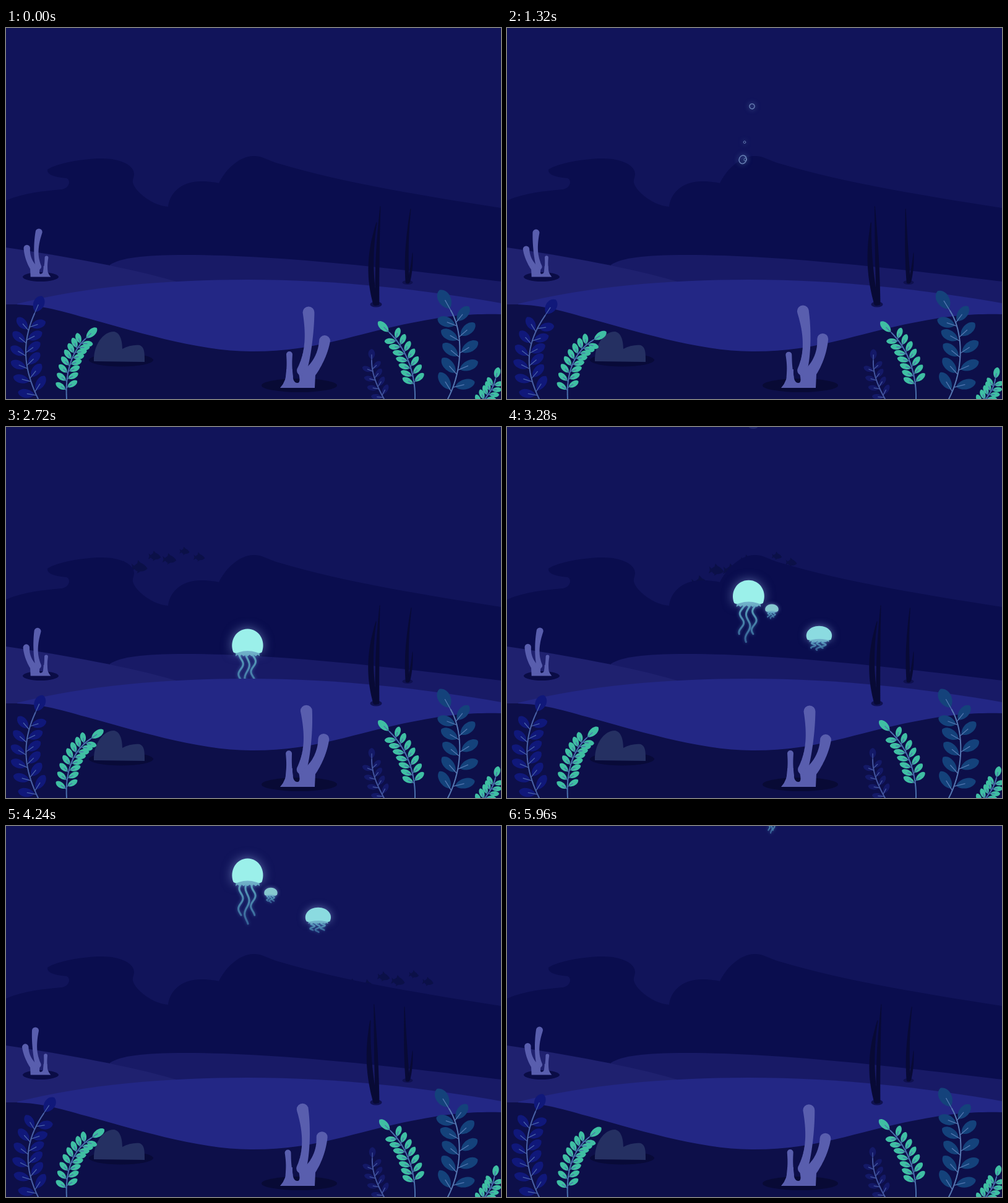
These frames come from a looping animation (800x600 px, 6 s). An HTML page with a canvas:

```html
<!DOCTYPE html>
<html lang="en">
<head>
<meta charset="utf-8">
<title>Deep sea</title>
<style>
html, body { margin: 0; width: 100%; height: 100%; overflow: hidden; background: #11145a; }
canvas { display: block; width: 100vw; height: 100vh; }
</style>
</head>
<body>
<canvas id="sea" width="800" height="600"></canvas>
<script>
const ctx = document.getElementById('sea').getContext('2d');
const LOOP = 6, SWAY = 3, TAU = Math.PI * 2;

const shapes = {
  mountain: 'M0 279C30 266 60 264 90 261C103 259 105 246 98 243C75 241 66 236 67 229C80 219 125 211 155 211C185 211 207 222 207 236C207 243 203 246 206 253C212 268 240 288 262 289C264 270 280 248 315 248C330 248 340 250 344 251C355 228 378 207 400 207C415 207 420 213 440 219C550 252 680 272 800 291V600H0Z',
  ridge: 'M168 383C185 372 220 367 290 367C450 367 650 392 800 410V500H168Z',
  leftHill: 'M0 355C100 370 200 388 275 410V500H0Z',
  centre: 'M18 446C130 418 260 407 390 407C540 407 680 424 800 445V600H18Z',
  front: 'M0 447C50 446 80 455 130 469C200 488 310 523 395 523C500 524 560 495 660 476C720 464 760 462 800 463V600H0Z',
  rock: 'M142 539C141 513 157 491 174 491C184 492 188 505 188 519C197 514 208 512 216 513C224 516 224 525 224 540Z',
  coralBase: 'M-28 0Q-17-12-18-30H-8Q-9-8 0-8Q7-8 0-30L29-22L28 0Z',
  fish: 'M15 2Q9-6 2-8L-3-13L-4-7L-10-2L-15-6L-13 1L-15 8L-9 4Q-6 8-3 8L-4 12L2 8Q11 8 15 2Z'
};
for (const k in shapes) shapes[k] = new Path2D(shapes[k]);

function fill(path, color) {
  ctx.fillStyle = color;
  ctx.fill(path);
}

function oval(x, y, rx, ry, color) {
  ctx.fillStyle = color;
  ctx.beginPath();
  ctx.ellipse(x, y, rx, ry, 0, 0, TAU);
  ctx.fill();
}

// 0 at rest, 1 fully bent; stays at rest until the delay has passed
function wave(t, period, delay = 0) {
  return t < delay ? 0 : (1 - Math.cos(TAU * (t - delay) / period)) / 2;
}

const quad = (a, b, c, u) => (1 - u) ** 2 * a + 2 * u * (1 - u) * b + u * u * c;

// Rounded limb along a curve: radius runs from r0 to r1, swelling in the middle
function limb([x0, y0, x1, y1, x2, y2], r0, r1, swell, bend) {
  ctx.beginPath();
  for (let u = 0; u <= 1.001; u += 0.01) {
    const [x, y] = bend(quad(x0, x1, x2, u), quad(y0, y1, y2, u));
    const r = r0 + (r1 - r0) * u + swell * Math.sin(Math.PI * u);
    ctx.moveTo(x + r, y);
    ctx.arc(x, y, r, 0, TAU);
  }
  ctx.fill();
}

function coral(x, y, sx, sy, s) {
  const bend = (px, py) => {
    const u = -py / 132;
    return [px - 15 * s * u ** 1.7, py - px * 0.15 * u * s];
  };
  ctx.save();
  ctx.translate(x, y);
  ctx.scale(sx, sy);
  fill(shapes.coralBase, '#595eae');
  limb([-13, -18, -13, -36, -13, -54], 6, 5, -1, bend);
  limb([7, -28, 22, -65, 18, -122], 8, 9.5, -2.5, bend);
  limb([18, -22, 40, -46, 44, -76], 10, 9, -1.5, bend);
  ctx.restore();
}

function kelp(curve, r0, r1, swell, amp) {
  const base = curve[1], height = base - curve[5];
  ctx.fillStyle = '#080a35';
  limb(curve, r0, r1, swell, (x, y) => [x + amp * Math.max(0, (base - y) / height) ** 1.8, y]);
}

function leaf(x, y, angle, len, w) {
  ctx.save();
  ctx.translate(x, y);
  ctx.rotate(angle);
  ctx.beginPath();
  ctx.moveTo(len * 0.1, 0);
  ctx.bezierCurveTo(len * 0.3, -w * 0.72, len * 0.9, -w * 0.72, len, 0);
  ctx.bezierCurveTo(len * 0.9, w * 0.72, len * 0.3, w * 0.72, len * 0.1, 0);
  ctx.fill();
  ctx.beginPath();
  ctx.moveTo(0, 0);
  ctx.lineTo(len * 0.5, 0);
  ctx.stroke();
  ctx.restore();
}

// Leaf pairs along a cubic stem, beginning at the fraction `bare`
function plant(stem, bare, pairs, len, w, tip, color, line, sway) {
  const [x0, y0, x1, y1, x2, y2, x3, y3] = stem;
  const at = u => {
    const mix = (p, q, r, s) => (1 - u) * quad(p, q, r, u) + u * quad(q, r, s, u);
    return [mix(x0, x1, x2, x3) + sway * u * u, mix(y0, y1, y2, y3) + Math.abs(sway) * 0.2 * u * u];
  };
  const dir = u => {
    const a = at(u - 0.02), b = at(u);
    return Math.atan2(b[1] - a[1], b[0] - a[0]);
  };
  ctx.fillStyle = color;
  ctx.strokeStyle = line;
  ctx.lineCap = 'round';
  ctx.lineWidth = 1.3;
  for (let i = 0; i < pairs; i++) {
    for (const side of [-1, 1]) {
      const u = bare + (0.96 - bare) * (i + (side > 0 ? 0.25 : 0)) / pairs;
      leaf(...at(u), dir(u) + side * 0.97, len * (1.05 - 0.12 * u), w);
    }
  }
  leaf(...at(1), dir(1), tip, w * 1.25);
  ctx.lineWidth = 2;
  ctx.beginPath();
  for (let u = 0; u <= 1.001; u += 0.05) ctx.lineTo(...at(u));
  ctx.stroke();
}

function drawSchool(t) {
  if (t < 1.3 || t > 5.3) return;
  const u = t - 2.12, count = 7;
  ctx.save();
  ctx.translate(71 + 242 * u + 30 * u * u - 13 * u ** 3, 206 - 12 * u + 12.5 * u * u);
  ctx.rotate(Math.max(0, 0.06 * u));
  for (let i = 0; i < count; i++) {
    const odd = i % 2, size = (30 - 2 * i - 4 * odd) / 30;
    ctx.save();
    ctx.translate(24 * i - 56, 44 * (1 - i / 6) ** 2 + (odd ? -6 : 4));
    ctx.scale(size, size);
    fill(shapes.fish, '#0b1048');
    ctx.restore();
  }
  ctx.restore();
}

function glow(color, blur) {
  ctx.shadowColor = color;
  ctx.shadowBlur = blur;
}

function bubble(x, y, rx, ry, lineWidth) {
  ctx.lineWidth = lineWidth;
  ctx.beginPath();
  ctx.ellipse(x, y, rx, ry, 0.4, 0, TAU);
  ctx.stroke();
}

function drawBubbles(t) {
  const rise = 300 * (t - 1.32);
  ctx.save();
  ctx.strokeStyle = 'rgba(122,150,200,.8)';
  glow('rgba(130,190,230,.8)', 8);
  bubble(381, 213 - rise, 5.8, 6.8, 1.5);
  bubble(385, 213 - rise, 2, 2.4, 1);
  bubble(384, 185 - rise, 1.9, 1.9, 1);
  bubble(396, 127 - rise, 4.1, 4.1, 1.4);
  ctx.restore();
  if (t > 3.22 && t < 3.42) oval(398, 0, 7, 3, 'rgba(110,130,190,.2)');
}

// p is the pulse: 0 wide and flat, 1 narrow and long
function jelly(x, y, r, p, reach, color, t) {
  const a = r * (1 - 0.12 * p), h = r * (1.12 + 0.45 * p), len = r * reach * (1 + p);
  ctx.save();
  ctx.translate(x, y);
  ctx.lineCap = ctx.lineJoin = 'round';
  ctx.lineWidth = 1.4 + r * 0.06;
  glow('rgba(90,160,210,.6)', 5);
  const fade = ctx.createLinearGradient(0, h, 0, h + len);
  fade.addColorStop(0, '#5ba5bc');
  fade.addColorStop(1, 'rgba(70,130,175,.65)');
  ctx.strokeStyle = fade;
  for (const side of [-1, 0, 1]) {
    ctx.beginPath();
    for (let v = 0; v <= 1.001; v += 0.05) {
      const swing = Math.sin(v * 9.5 - t * 5 + side * 0.4) * r * (0.17 - 0.06 * p);
      ctx.lineTo(a * (0.4 * side - 0.08 * v) + swing, h * 1.05 + len * v * (side ? 0.78 : 1));
    }
    ctx.stroke();
  }
  ctx.fillStyle = '#62aabd';
  ctx.beginPath();
  ctx.moveTo(-a * 0.72, h * 0.82);
  for (let i = -12; i <= 12; i++) ctx.lineTo(a * 0.78 * i / 12, h * (1.08 + 0.03 * Math.cos(i * Math.PI / 2)));
  ctx.lineTo(a * 0.72, h * 0.82);
  ctx.fill();
  glow('rgba(170,200,250,.5)', r * 0.6);
  ctx.fillStyle = color;
  ctx.beginPath();
  ctx.moveTo(-a * 0.92, h * 0.95);
  ctx.bezierCurveTo(-a * 1.2, h * 0.5, -a * 0.75, 0, 0, 0);
  ctx.bezierCurveTo(a * 0.75, 0, a * 1.2, h * 0.5, a * 0.92, h * 0.95);
  ctx.quadraticCurveTo(a * 0.78, h * 1.02, a * 0.55, h * 0.95);
  ctx.quadraticCurveTo(0, h * 0.84, -a * 0.55, h * 0.95);
  ctx.quadraticCurveTo(-a * 0.78, h * 1.02, -a * 0.92, h * 0.95);
  ctx.fill();
  ctx.restore();
}

function drawJellies(t) {
  if (t < 1.6) return;
  const quick = wave(t, 1.1, 1.03);
  jelly(390.5, 409 - 41.5 * (t - 1.31) ** 2, 27.5, wave(t, 1.5, 0.73), 1.3, '#9bf0ea', t);
  jelly(504.5, 322 - 198 * (t - 3.28), 20.7, quick, 0.68, '#8bdbe0', t);
  jelly(428, 45 * (5.92 - t) ** 2 - 27, 10.8, quick, 0.95, '#86c8cf', t);
}

function drawPlants(s, late) {
  const green = '#3fbfa3', line = '#4a70ac';
  plant([52, 600, 28, 550, 25, 510, 46, 462], 0.04, 6, 29, 13, 31, '#10187a', '#4a63a8', 16 * s);
  plant([98, 600, 95, 550, 110, 520, 128, 503], 0.1, 8, 20, 8.5, 26, green, line, 17 * late);
  plant([611, 600, 600, 580, 591, 560, 591, 538], 0.04, 4, 19, 8, 19, '#141967', '#4457a0', s);
  plant([661, 600, 662, 560, 648, 520, 620, 493], 0.2, 7, 21, 8.5, 26, green, line, 2 * s);
  plant([714, 600, 740, 550, 738, 490, 719, 457], 0.08, 5, 35, 15, 38, '#14427b', '#5578b2', -3 * s);
  plant([766, 612, 776, 595, 786, 588, 791, 568], 0.04, 5, 18, 7.5, 20, green, line, -2 * s);
}

function draw(t) {
  const s = wave(t, SWAY), late = wave(t, SWAY, 0.25);
  ctx.fillStyle = '#11145a';
  ctx.fillRect(0, 0, 800, 600);
  drawSchool(t);
  fill(shapes.mountain, '#0a0d4e');
  fill(shapes.ridge, '#181a66');
  fill(shapes.leftHill, '#1f216f');
  drawBubbles(t);
  drawJellies(t);
  fill(shapes.centre, '#232785');
  fill(shapes.front, '#0d0f49');

  oval(649, 411.5, 8.5, 3.5, '#0f1150');
  kelp([649, 410, 645, 360, 653, 293], 3.5, 0.7, 0.5, 11 * wave(t + 1.8, SWAY) - 9);
  kelp([651, 409, 656, 390, 657, 364], 2.5, 0.5, 0.3, 0);
  oval(598, 447, 9.5, 4.5, '#0f1150');
  kelp([597, 445, 582, 385, 599, 315], 4, 0.8, 2, -11 * s);
  kelp([600, 445, 599, 370, 605, 289], 3.5, 0.7, 0.9, -11 * s);

  oval(56, 402.5, 29, 7.5, '#0a0c46');
  coral(56, 402.5, -0.583, 0.583, 1 - late);
  oval(186, 537, 52, 10.5, '#080a38');
  fill(shapes.rock, '#253062');
  oval(474, 578, 61, 11, '#080a35');
  coral(471, 582, 1, 1, late);
  drawPlants(s, wave(t, SWAY, 0.45));
}

function tick() {
  draw(performance.now() / 1000 % LOOP);
  requestAnimationFrame(tick);
}
tick();
</script>
</body>
</html>
```
